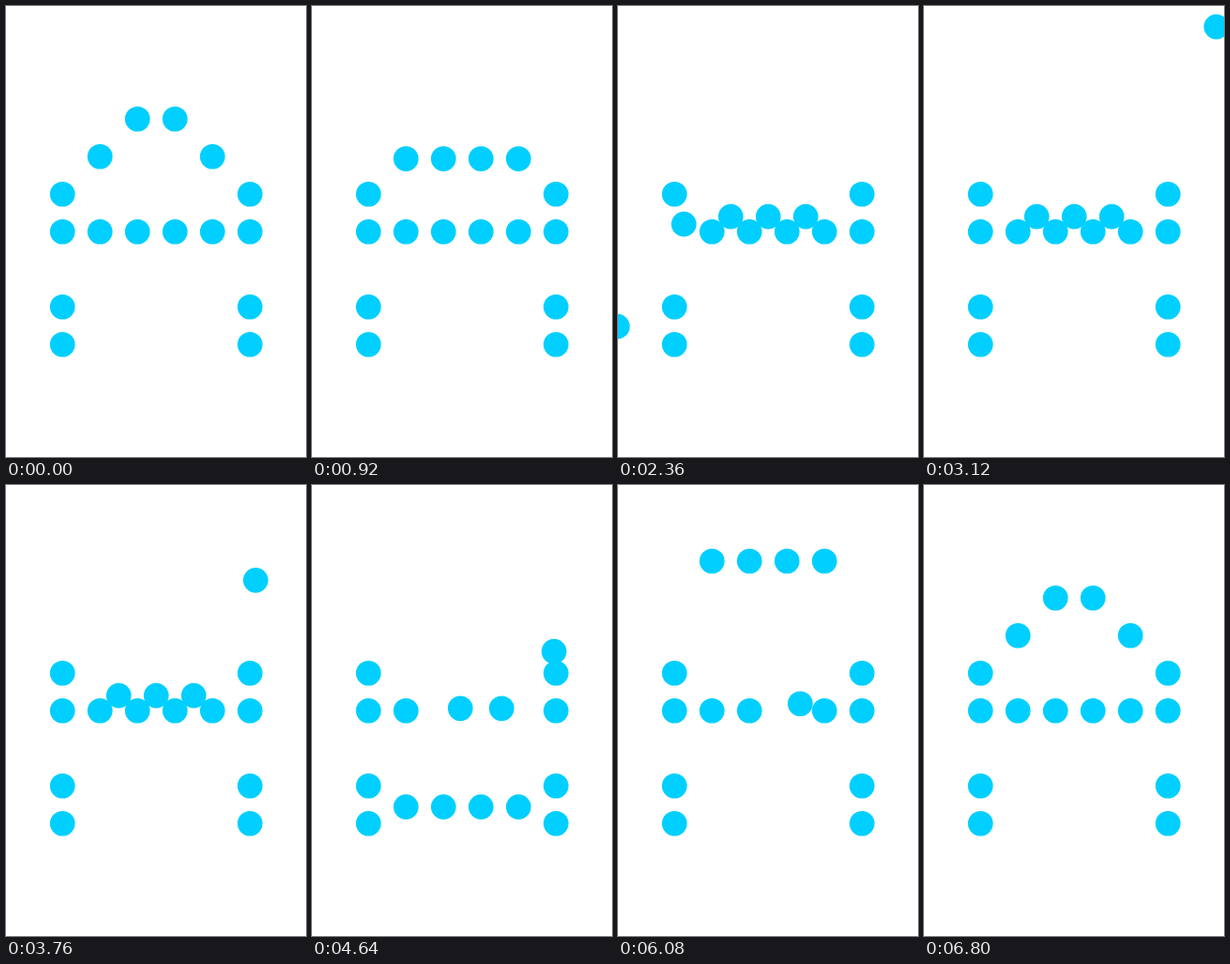
Animation, 320 px wide and 480 px high, one loop 7140 ms. Source, as an HTML page:

```html
<!DOCTYPE html>
<html lang="en">
<head>
<meta charset="utf-8">
<title>Falling dots</title>
<style>
  html, body { margin: 0; width: 100%; height: 100%; overflow: hidden; background: #fff; }
  svg { display: block; width: 320px; height: 480px; }
  circle { fill: #00cfff; }
</style>
</head>
<body>
<svg id="stage" viewBox="0 0 320 480"></svg>
<script>
const LOOP = 7140, HOLD = 600, STEP = 40, LAST = 156;
const GRID = 40, ROW = 240, RADIUS = 13.35, SHIFT = 0.25;
const CONTACT = 25.7;                       // centre distance of touching dots
const REST = Math.asin(GRID / 2 / CONTACT); // angle of a dot lying in a gap
const FALL_IN = 4.7, FALL_OUT = 8.53, FALL_BACK = 5.28;

const column = i => 100 + GRID * i;
const roof = i => (i % 3 ? 120 : 160);
const phase = (n, from, to) => Math.min(1, Math.max(0, (n - from) / (to - from)));
const mix = (a, b, u) => a.map((v, k) => v + (b[k] - v) * u);

// Bezier curve of any degree.
function bezier(u, ...points) {
  while (points.length > 1) {
    points = points.slice(1).map((p, k) => mix(points[k], p, u));
  }
  return points[0];
}

// Falls onto the row, then rolls left around the dot below.
function roll(i, n) {
  const angle = REST * phase(n, 20, 30) ** 1.45;
  const y = Math.min(120 + FALL_IN * n, ROW - CONTACT * Math.cos(angle));
  return [column(i) - CONTACT * Math.sin(angle), Math.max(roof(i), y)];
}

// Moves from the gap into its place in the row.
function upper(i, n) {
  const seat = roll(i, Math.min(n, 30));
  if (i === 0) return mix(seat, [60, ROW], phase(n, 30, 60));
  if (i === 1) return mix(seat, [100, ROW], phase(n, 90, 100));
  const side = i === 2 ? -1 : 1;
  const target = [seat[0] + side * GRID / 2, ROW];
  return bezier(phase(n, 90, 120), seat, [seat[0] - side * 2.5, ROW + 7], target);
}

// Drops out of the row and comes back from above as the roof.
function lower(i, n) {
  const y = n <= 120
    ? ROW + FALL_OUT * Math.max(0, n - 90)
    : Math.min(roof(i), FALL_BACK * (n - 120) - 14.3);
  return [column(i), y];
}

// Is pushed out on the left, returns on the right and lands in the open place.
function runner(n) {
  if (n < 60) return bezier(phase(n, 30, 60), [60, ROW], [-25.6, 271], [7.6, 406], [-14, 456]);
  if (n < 90) return bezier(phase(n, 60, 90), [334, 10], [271, 34], [262, 103], [260, 160]);
  if (n < 120) return bezier(phase(n, 90, 120), [260, 160], [265, 176], [255, 183], [216, 213]);
  return bezier(phase(n, 120, 150), [216, 213], [203, 223], [192, 238], [180, ROW]);
}

function pose(n) {
  const posts = [60, 260].flatMap(x => [200, 320, 360].map(y => [x, y]));
  const pairs = [0, 1, 2, 3].flatMap(i => [upper(i, n), lower(i, n)]);
  return [...posts, [260, ROW], runner(n), ...pairs];
}

const stage = document.getElementById("stage");
const dots = pose(0).map(() => {
  const dot = document.createElementNS("http://www.w3.org/2000/svg", "circle");
  dot.setAttribute("r", RADIUS);
  return stage.appendChild(dot);
});

function draw(time) {
  const t = time % LOOP;
  const n = t < HOLD ? 0 : Math.min(LAST, Math.floor((t - HOLD) / STEP) + 1);
  pose(n).forEach(([x, y], k) => {
    dots[k].setAttribute("cx", (x + SHIFT).toFixed(2));
    dots[k].setAttribute("cy", (y + SHIFT).toFixed(2));
  });
}

const start = performance.now();
function tick() {
  draw(performance.now() - start);
  requestAnimationFrame(tick);
}
tick();
</script>
</body>
</html>
```
